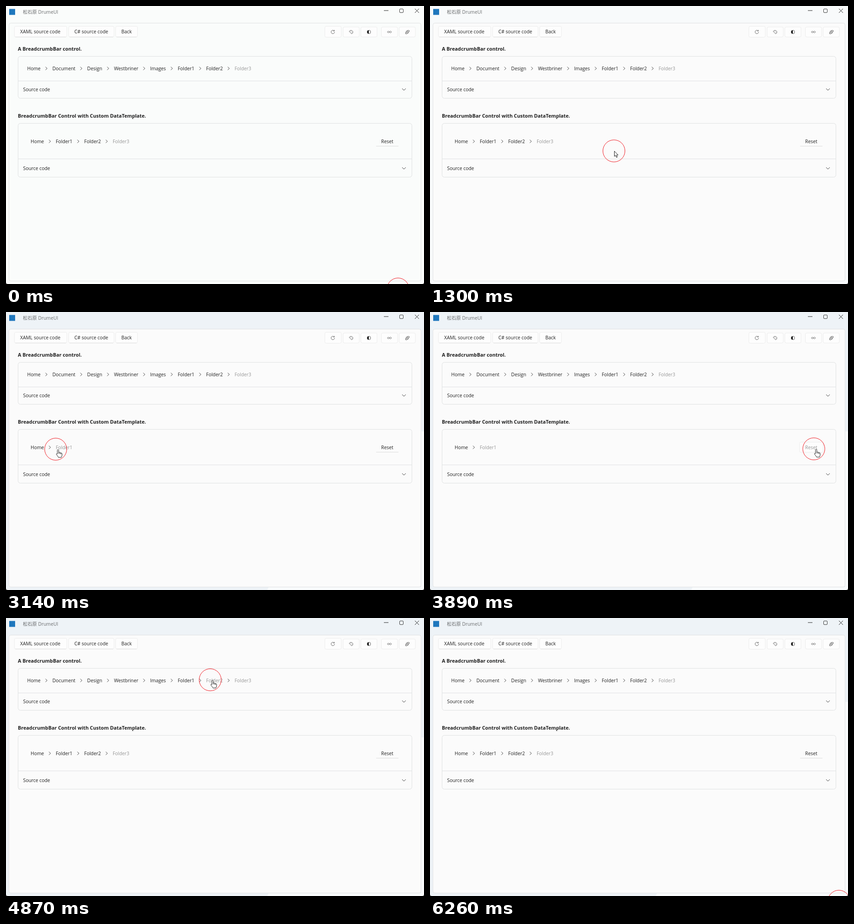
Write an HTML page that moves like this. It is 917x610 px and loops after 6410 ms.

```html
<!DOCTYPE html>
<html lang="en">
<head>
<meta charset="utf-8">
<title>Breadcrumb demo</title>
<style>
  html, body { margin: 0; width: 100%; height: 100%; overflow: hidden; }
  svg { display: block; width: 917px; height: 610px; font: 10.35px "Open Sans", "Noto Sans", sans-serif; }
  text { fill: #202020; }
  .heading { font-size: 10.8px; font-weight: 700; }
  .title { font: 10.3px "Open Sans", "Noto Sans CJK SC", "Noto Sans CJK", sans-serif; fill: #6a6c6e; }
  .muted { fill: #969696; }
  .line { fill: none; stroke: #404040; }
  .thin { fill: none; stroke: #555; stroke-width: .9; }
  .edge { fill: none; stroke: #dfe1e2; }
  .button { fill: #fdfdfd; stroke: #ececec; }
  .glow { fill: #f9fbfc; }
  .pointer { fill: #fff; stroke: #1c1c1c; stroke-linejoin: round; }
  .ring { fill: none; stroke: #f01820; }
</style>
</head>
<body>
<svg id="stage" viewBox="0 0 917 610"></svg>
<script>
const LOOP = 6410, STEP = 50;
const stage = document.getElementById("stage");

function add(tag, attrs, content) {
  const node = document.createElementNS("http://www.w3.org/2000/svg", tag);
  for (const key in attrs) node.setAttribute(key, attrs[key]);
  if (content) node.textContent = content;
  stage.append(node);
  return node;
}
const label = (x, y, content, cls = "") => add("text", { x, y, class: cls }, content);
const path = (d, cls, extra) => add("path", { d, class: cls, ...extra });
const box = (x, y, width, height, rx, cls) => add("rect", { x, y, width, height, rx, class: cls });
const show = (node, on) => node.setAttribute("visibility", on ? "visible" : "hidden");

// Window and its tinted frame
const backdrop = add("rect", { width: 917, height: 610 });
const sideGlow = path("", "glow");
const baseGlow = path("", "glow");
path("M0 607V610H3ZM917 607V610H914Z", "", { fill: "#777" });
const panel = box(6.5, 37.5, 904, 566, 4, "edge");
add("rect", { x: 7, y: 6.5, width: 13, height: 13, fill: "#1f77bd" });
label(37, 16.5, "松石原 DrumeUI", "title");
path("M829 10H839M897 6L906 15M906 6L897 15", "line", { style: "stroke:#222" });
box(863.5, 6.5, 8, 8, 1.5, "line");

// Toolbar
function button(x, width, content) {
  box(x, 44.5, width, 23.5, 3, "button");
  path(`M${x + 2} 68h${width - 4}`, "", { stroke: "#e0e0e0" });
  label(x + 12.5, 60, content);
}
button(18.5, 115, "XAML source code");
button(137.5, 99.5, "C# source code");
button(240.5, 48, "Back");
box(699.5, 44.5, 36, 24, 3, "button");
for (const x of [739.5, 778.5, 823.5, 862.5]) box(x, 46, 35.5, 22, 3, "button");

const icon = (x, d) => path(d, "thin", { transform: `translate(${x} 57)` });
icon(717, "M2.8-2.6A3.8 3.8 0 1 0 3.8 0M3.3-4.5V-2H.8");
icon(757, "M-4-1C-3-4.5 3-4.5 4-.5C4.5 3 1 5 0 3C-.5 1-2 1-4-1ZM-1-1.5H0M1.5.5H2.5");
icon(796, "M0-4A4 4 0 0 1 0 4").after(path("M796 53A4 4 0 0 0 796 61Z", "", { fill: "#222" }));
icon(841, "M0 0C-1.5-2.5-4-2-4 0S-1.5 2.5 0 0C1.5-2.5 4.5-2 4.5 0S1.5 2.5 0 0Z");
icon(880, "M.5-3.5h4v3h-4ZM-3.5 1H0V4H-3.5ZM.5-2H-2V1M.5 2.5H2.5V-.5");

// Cards
function card(top, divider, bottom, heading) {
  label(26, top - 13, heading, "heading");
  box(26.5, top, 864, bottom - top, 5, "edge");
  path(`M27 ${divider}H890`, "edge");
  label(37.5, bottom - 15.5, "Source code");
  path(`M869 ${bottom - 21.5}l4 4l4-4`, "line");
}
card(110.5, 164.5, 202.5, "A BreadcrumbBar control.");
card(257.5, 335.5, 375.5, "BreadcrumbBar Control with Custom DataTemplate.");

// Each crumb starts a fixed gap after the one before it
function breadcrumbs(start, mid, names) {
  const gap = 25.9;
  let x = start;
  return names.map((name, i) => {
    const sep = i ? path(`M${x - 15} ${mid - 3.5}l3.5 3.5l-3.5 3.5`, "line") : null;
    const text = label(x, mid + 4, name);
    const crumb = { x, right: x + text.getComputedTextLength(), mid, text, sep };
    x = crumb.right + gap;
    return crumb;
  });
}
const folders = ["Folder1", "Folder2", "Folder3"];
const longTrail = breadcrumbs(46.5, 137, ["Home", "Document", "Design", "Westbriner", "Images", ...folders]);
const shortTrail = breadcrumbs(54, 297, ["Home", ...folders]);
const resetFrame = box(810.5, 285.5, 52, 22.5, 3, "button");
const resetLine = path("M812 307.5H861", "", { stroke: "#dcdcdc" });
const resetText = label(823, 301, "Reset");

// Pointer
const ring = add("circle", { r: 24.2, class: "ring" });
const arrow = path("M.5 .5V12L3 9.7L5 14.2L7 13.3L5.1 9H8.7Z", "pointer");
const hand = path("M4.5 1C5.5 1 6.2 1.6 6.2 2.6V7.3C7 6.6 8.4 6.8 8.8 7.8C9.6 7.2 10.8 7.5 11.1 8.5C12.3 8 13.4 8.7 13.4 10V13C13.4 15 12.4 16 12 18H5.5C5 16.5 2.5 13.5 1 11.5C.5 10 2 9.3 3.2 10.5V2.6C3.2 1.6 3.7 1 4.5 1ZM6.2 7.3V10M8.8 8V10.5M11.1 8.5V11", "pointer");

// Pointer strokes: each bends from the previous resting place to the next one
const home = [860, 621];
const strokes = [
  { from: 0, to: 650, end: [838, 323], bend: [433, 470] },
  { from: 650, to: 1300, end: [403.5, 318], bend: [620, 281] },
  { from: 1300, to: 1860, end: [185, 298], bend: [50, 367] },
  { from: 2020, to: 2270, end: [131.7, 297.3] },
  { from: 2540, to: 3140, end: [109, 301] },
  { from: 3140, to: 3690, end: [842, 300.3] },
  { from: 3990, to: 4460, end: [714, 157] },
  { from: 4460, to: 4860, end: [448, 135.6], bend: [320, 132] },
  { from: 4860, to: 5120, end: [713, 180] },
  { from: 5120, to: 5790, end: [881, 600], bend: [860, 240] },
  { from: 5790, to: 6260, end: [897, 621.5], bend: [885, 660] }
];

const easeOut = k => 1 - (1 - k) ** 1.5;

function pointerAt(t) {
  const i = strokes.findLastIndex(s => s.from <= t);
  const { from, to, end, bend } = strokes[i];
  const start = i ? strokes[i - 1].end : home;
  const held = t >= to ? to : from + Math.floor((t - from) / STEP) * STEP;
  const k = easeOut((held - from) / (to - from));
  return start.map((a, axis) => {
    const c = bend ? bend[axis] : (a + end[axis]) / 2;
    return (1 - k) ** 2 * a + 2 * k * (1 - k) * c + k * k * end[axis];
  });
}

const gray = (from, to, k) => `rgb(${from.map((v, i) => Math.round(v + (to[i] - v) * k))})`;

// Draws the first crumbs and tells whether the pointer is over one of them
function drawTrail(trail, count, x, y) {
  let hovered = false;
  trail.forEach(({ x: left, right, mid, text, sep }, i) => {
    const visible = i < count;
    const over = visible && x > left - 3 && x < right + 3 && Math.abs(y - mid) < 10;
    hovered ||= over;
    show(text, visible);
    if (sep) show(sep, visible);
    text.setAttribute("class", over || i === count - 1 ? "muted" : "");
  });
  return hovered;
}

function drawFrame(t) {
  const active = Math.min(1, Math.max(0, (t - 1350) / 720));
  backdrop.setAttribute("fill", t < 700 ? "#fafcfb" : gray([248, 250, 251], [238, 243, 247], active));
  panel.style.fill = t < 700 ? "#fafcfb" : "#fbfbfb";
  const spread = t >= 5840 ? 78 : 0;
  sideGlow.setAttribute("d", `M911 ${262 - spread}H917V610H911Z`);
  baseGlow.setAttribute("d", `M${576 - spread} 604H917V610H${573 - spread}Z`);
  show(sideGlow, active > 0);
  show(baseGlow, active > 0);

  const [x, y] = pointerAt(t);
  const count = t < 2070 || t >= 3990 ? 4 : t < 2640 ? 3 : 2;
  const overLong = drawTrail(longTrail, longTrail.length, x, y);
  const overShort = drawTrail(shortTrail, count, x, y);
  const overReset = x > 810 && x < 863 && y > 285 && y < 308;
  show(resetFrame, overReset);
  show(resetLine, !overReset);
  resetText.setAttribute("class", overReset && t >= 3840 ? "muted" : "");

  const pointing = overLong || overShort || overReset;
  ring.setAttribute("cx", x);
  ring.setAttribute("cy", y);
  for (const cursor of [arrow, hand]) cursor.setAttribute("transform", `translate(${x + .5} ${y})`);
  show(hand, pointing);
  show(arrow, !pointing);
}

const begin = performance.now();
function tick() {
  drawFrame((performance.now() - begin) % LOOP);
  requestAnimationFrame(tick);
}
tick();
</script>
</body>
</html>
```
